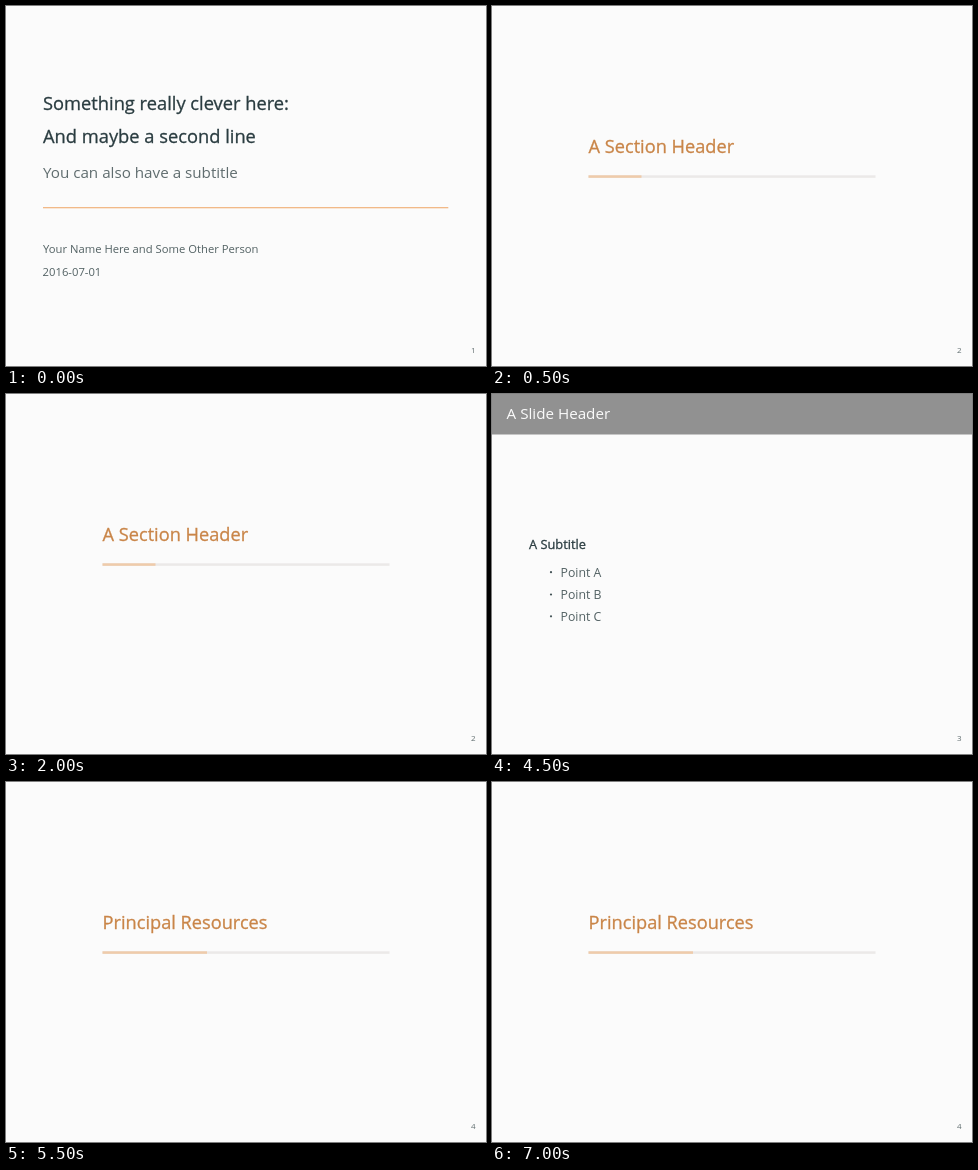
Animation of 480 by 360 pixels, one loop 8 s. Source, as an HTML page:

```html
<!DOCTYPE html>
<html lang="en">
<head>
<meta charset="utf-8">
<title>Slides</title>
<style>
  html, body { margin: 0; width: 100%; height: 100%; overflow: hidden; background: #fbfbfb; }
  svg { display: block; width: 480px; height: 360px; }
  text { font-family: "Open Sans", "Noto Sans", sans-serif; fill: #526163; }
  .title { font-size: 18.3px; fill: #2a3c40; stroke: #2a3c40; stroke-width: .3px; }
  .sub { font-size: 15.2px; fill: #5f6c6e; }
  .small { font-size: 11.25px; }
  .section { font-size: 18.2px; fill: #c98548; stroke: #c98548; stroke-width: .3px; }
  .header { font-size: 15.2px; fill: #fbfbfb; }
  .block { font-size: 12.8px; fill: #2a3c40; stroke: #2a3c40; stroke-width: .3px; }
  .item { font-size: 12.3px; }
  .page { font-size: 8px; fill: #5f6c6e; text-anchor: middle; }
</style>
</head>
<body>
<svg id="stage" viewBox="0 0 480 360"></svg>
<script>
const LOOP = 8000;
const stage = document.getElementById("stage");

const text = (x, y, cls, s) => `<text x="${x}" y="${y}" class="${cls}">${s}</text>`;
const rect = (x, y, w, h, fill) =>
  `<rect x="${x}" y="${y}" width="${w}" height="${h}" fill="${fill}"/>`;

const section = (title, done) =>
  text(96.6, 147.2, "section", title) +
  rect(96.5, 169.3, 287, 2.5, "#ebe9e8") +
  rect(96.5, 169.3, done, 2.5, "#efcbaa");

const bullet = (y, s) =>
  `<circle cx="59" cy="${y - 4.5}" r="1.1" fill="#435356"/>` + text(68.5, y, "item", s);

const slides = [
  { start: 0, body:
    text(37, 103.5, "title", "Something really clever here:") +
    text(37, 136.5, "title", "And maybe a second line") +
    text(37, 172, "sub", "You can also have a subtitle") +
    rect(37, 201.1, 405.3, 1.2, "#f0b27c") +
    text(37, 247.3, "small", "Your Name Here and Some Other Person") +
    text(36.6, 270, "small", "2016-07-01") },
  { start: 500, body: section("A Section Header", 53) },
  { start: 3000, body:
    rect(0, 0, 480, 40.5, "#919191") +
    text(14.6, 25.3, "header", "A Slide Header") +
    text(37, 154.6, "block", "A Subtitle") +
    bullet(182.7, "Point A") + bullet(205, "Point B") + bullet(226.8, "Point C") },
  { start: 5500, body: section("Principal Resources", 104.5) }
];

stage.innerHTML = rect(0, 0, 480, 360, "#fbfbfb") + slides.map((s, i) =>
  `<g visibility="hidden">${s.body}${text(467.3, 346.5, "page", i + 1)}</g>`).join("");
const groups = [...stage.querySelectorAll("g")];

function draw(now) {
  const t = now % LOOP;
  const active = slides.filter(s => s.start <= t).length - 1;
  groups.forEach((g, i) => g.setAttribute("visibility", i === active ? "visible" : "hidden"));
}

function tick() {
  draw(performance.now());
  requestAnimationFrame(tick);
}
tick();
</script>
</body>
</html>
```
